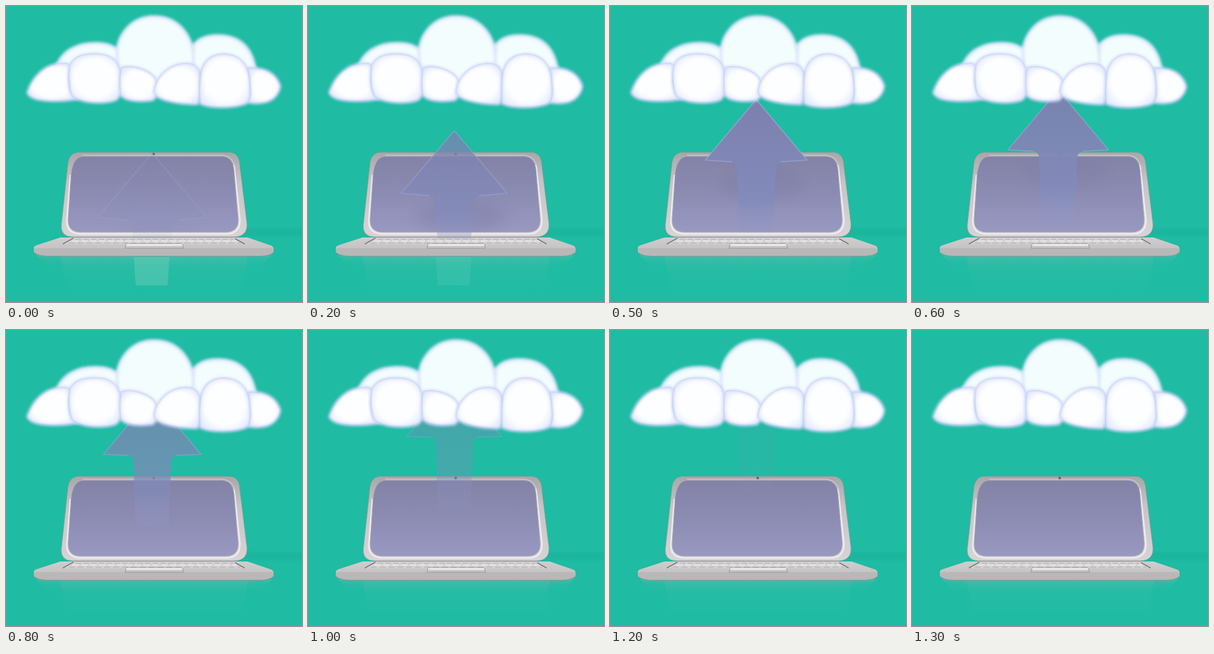
An HTML page that plays this animation: 500 by 500 pixels, repeating every 2100 ms.

```html
<!DOCTYPE html>
<html lang="en">
<head>
<meta charset="utf-8">
<title>Upload to the cloud</title>
<style>
  html, body { margin: 0; width: 100%; height: 100%; overflow: hidden; background: #1fbba3; }
  svg { display: block; width: 100%; height: 100%; }
  .back path { fill: #f4fdfd; stroke: #dbe8fd; stroke-width: 5; }
  .front path { fill: url(#puff); }
  .front .rim { fill: none; stroke: #d0d9fa; stroke-width: 3.5; }
  .front .line { fill: none; stroke: #aebaf0; stroke-width: 1; opacity: .5; }
</style>
</head>
<body>
<svg viewBox="0 0 500 500">
  <defs>
    <filter id="soft" x="-20%" y="-20%" width="140%" height="140%"><feGaussianBlur stdDeviation="2.2"/></filter>
    <filter id="haze" x="-50%" y="-50%" width="200%" height="200%"><feGaussianBlur stdDeviation="10"/></filter>
    <radialGradient id="puff" r=".62">
      <stop offset=".62" stop-color="#fdfeff"/><stop offset="1" stop-color="#e2e9fd"/>
    </radialGradient>
    <linearGradient id="screen" x2="0" y2="1">
      <stop stop-color="#8382a6"/><stop offset=".5" stop-color="#8c8cb3"/><stop offset="1" stop-color="#9898c1"/>
    </linearGradient>
    <linearGradient id="lid" x2="0" y2="1">
      <stop stop-color="#a8a7a8"/><stop offset=".35" stop-color="#c6c4c6"/><stop offset="1" stop-color="#d6d4d6"/>
    </linearGradient>
    <linearGradient id="deck" x2="0" y2="1">
      <stop stop-color="#cfcdcd"/><stop offset=".6" stop-color="#c5c3c3"/><stop offset="1" stop-color="#b5b3b3"/>
    </linearGradient>
    <linearGradient id="mirror" x2="0" y2="1">
      <stop stop-color="#7fbcae" stop-opacity=".35"/><stop offset=".3" stop-color="#6fc0b3" stop-opacity=".17"/>
      <stop offset="1" stop-color="#6fc0b3" stop-opacity="0"/>
    </linearGradient>
    <linearGradient id="arrowFill" x2="0" y2="1">
      <stop stop-color="#7d80ae"/><stop offset=".5" stop-color="#8087b6"/>
      <stop offset=".75" stop-color="#838bba"/><stop offset="1" stop-color="#9499c5" stop-opacity=".3"/>
    </linearGradient>
    <clipPath id="above"><path d="M0 0H500V393H0Z"/></clipPath>
    <clipPath id="glass"><path d="M130 254H366Q383 255 385 276L392 358Q394 381 372 382H125Q104 381 105 360L110 284Q113 255 130 254Z"/></clipPath>
  </defs>
  <rect width="500" height="500" fill="#1fbba3"/>

  <!-- floor -->
  <path d="M380 376H510V388H380Z" fill="#17a994" opacity=".3" filter="url(#soft)"/>
  <path d="M50 421H450L430 439H70Z" fill="url(#mirror)"/>
  <path d="M92 423H408L398 490H104Z" fill="url(#mirror)" opacity=".6"/>
  <path id="stemMirror" d="M216 424H276L273 472H219Z" fill="#91d3c4"/>

  <!-- laptop -->
  <path d="M122 247.500H378Q391 248 394 262L407 368Q408 389 386 390H112Q92 389 93.500 370L105 264Q108 248 122 247.500Z" fill="url(#lid)" stroke="#9b9a9c" stroke-width=".8"/>
  <path d="M385 268L395 360Q396 385 372 385H125Q101 384 103 360L109 285" fill="none" stroke="#eceaec" stroke-width="3"/>
  <path d="M130 252H364Q382 253 387 272" fill="none" stroke="#c9c7cb" stroke-width="1.500"/>
  <path d="M130 254H366Q383 255 385 276L392 358Q394 381 372 382H125Q104 381 105 360L110 284Q113 255 130 254Z" fill="url(#screen)" stroke="#aaa8bd"/>
  <circle cx="249.500" cy="250" r="2.300" fill="#686870"/>
  <path d="M92 391H408L449 405Q452 407 452 411V416Q446 422 430 422.500H70Q53 422 47 416V408Q48 405 52 404Z" fill="url(#deck)"/>
  <path d="M47 410Q52 408 60 409H440Q449 408 452 411V416Q446 422 430 422.500H70Q53 422 47 416Z" fill="#b9b7b7"/>
  <path d="M47 416Q53 422 70 422.500H430Q446 422 452 416" fill="none" stroke="#8f9492"/>
  <path d="M112 390.500H388" stroke="#8d8b8e"/>
  <path d="M114 392H387L401 402H98Z" fill="#d3d1d1"/>
  <g fill="none" stroke="#b0aeb0" stroke-width="1.200">
    <path d="M118 394H384" stroke-dasharray="9 4"/>
    <path d="M112 397H390" stroke="#e8e6e8" stroke-width="2" stroke-dasharray="11 4"/>
    <path d="M106 400.500H396" stroke-dasharray="10 5"/>
  </g>
  <path d="M114 392L96 402M387 393L403 402" stroke="#77777b" stroke-width="1.500"/>
  <path d="M203 402H298L300 409H201Z" fill="#cbc9ca" stroke="#979597"/>
  <path d="M203 403.500H298" stroke="#fff" stroke-width="2"/>

  <!-- arrow -->
  <g clip-path="url(#glass)"><ellipse id="shade" cx="258" rx="75" ry="27" fill="#65648a" filter="url(#haze)"/></g>
  <g clip-path="url(#above)">
    <path id="arrow" fill="url(#arrowFill)"/>
    <path id="edge" fill="none" stroke="#a0a8d4" stroke-width="2" stroke-linejoin="round"/>
  </g>

  <g class="back" filter="url(#soft)">
    <path d="M85 104C94 76 120 63 150 63Q178 63 188 75V112Z"/>
    <path d="M314 112L318 65Q331 49 360 50C396 51 415 72 421 106Z"/>
    <path d="M190 148L188 90C184 52 210 18 250 18C294 18 320 55 316 100L326 148Z"/>
  </g>
  <g class="front" id="front"></g>
</svg>
<script>
const $ = id => document.getElementById(id);

const lobes = [
  "M36 146C45 119 65 98 95 97Q111 95 108 110C104 130 108 148 120 157C92 162 42 164 36 146Z",
  "M409 105C430 104 454 108 463 135C462 149 450 161 435 163Q420 166 408 162C415 145 408 122 409 105Z",
  "M108 100C115 83 135 80 155 81C180 82 192 95 193 115C194 135 195 155 185 159C160 167 125 163 112 152C105 140 105 110 108 100Z",
  "M195 104C215 98 245 110 252 122C258 135 258 150 248 159C225 163 200 160 194 150C191 135 192 115 195 104Z",
  "M250 145C252 120 275 97 305 97C322 97 328 108 328 120C328 140 330 160 322 166C295 166 252 160 250 145Z",
  "M328 120C330 95 345 81 368 81C395 82 408 98 411 120C413 140 415 158 405 165C385 173 345 173 328 165C326 150 327 135 328 120Z"
];
$("front").innerHTML = lobes.map(d =>
  `<g filter="url(#soft)"><path d="${d}"/><path class="rim" d="${d}"/></g><path class="line" d="${d}"/>`).join("");

const fade = [.08, .4, .75, 1, 1, 1, .95, .86, .73, .55, .37, .2, .08, 0];

function draw(now) {
  const k = Math.min(13, Math.floor(now % 2100 / 100));
  const x = 247, y = 357 - 21 * k + .33 * k * k;
  const tip = y - 107 + 1.2 * k, half = 92 - 1.2 * k, top = 35 - .4 * k;
  const drop = 7 - .4 * k, foot = Math.max(y + 80, Math.min(393, y + 122));
  const head = `${x - half} ${y}L${x - 2} ${tip + 1}Q${x} ${tip - 1} ${x + 2} ${tip + 1}L${x + half} ${y}`;
  const right = `L${x + top + 8} ${y + drop - 2}Q${x + top} ${y + drop} ${x + top} ${y + drop + 8}`;
  const left = `L${x - top} ${y + drop + 8}Q${x - top} ${y + drop} ${x - top - 8} ${y + drop - 2}`;
  $("arrow").setAttribute("d", `M${head}${right}L${x + 28} ${foot}H${x - 28}${left}Z`);
  $("edge").setAttribute("d", `M${x - top - 8} ${y + drop - 2}L${head}L${x + top + 8} ${y + drop - 2}`);
  $("arrow").setAttribute("opacity", fade[k]);
  $("edge").setAttribute("opacity", fade[k] * .6 + (k < 1 ? .2 : 0));
  $("shade").setAttribute("cy", y + 40);
  $("shade").setAttribute("opacity", k < 8 ? fade[k] * .3 * (1 - k / 9) : 0);
  $("stemMirror").setAttribute("opacity", Math.max(0, .3 - .08 * k));
  requestAnimationFrame(draw);
}
draw(0);
</script>
</body>
</html>
```
